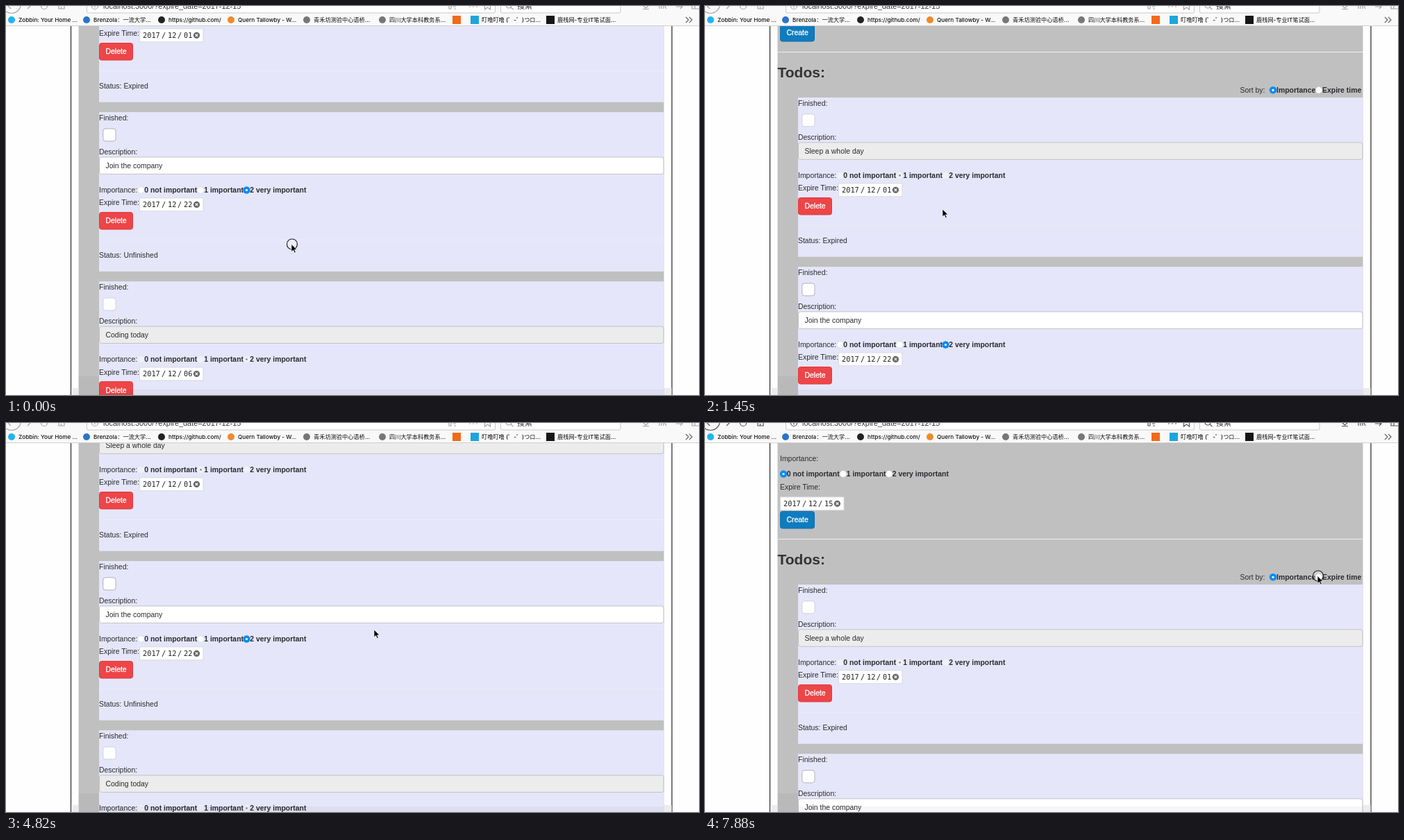
These frames come from a looping animation (998x561 px, 8000 ms). An HTML page:

```html
<!DOCTYPE html>
<html lang="en">
<head>
<meta charset="utf-8">
<title>Todo list</title>
<style>
  html, body { margin: 0; width: 100%; height: 100%; overflow: hidden; background: #fefefe; }
  svg { display: block; width: 998px; height: 561px; }
  text { font: 10.45px "Liberation Sans", Arial, sans-serif; fill: #2b2b2f; white-space: pre; }
  .b { font-weight: bold; }
  .h { font-size: 21px; font-weight: bold; fill: #333; }
  .date { font: 10.3px "DejaVu Sans Mono", monospace; fill: #222; }
  .btn { fill: #fff; stroke: #fff; stroke-width: .3; }
  .mark { font: 500 8.2px Inter, "Noto Sans CJK SC", "Noto Sans CJK", sans-serif; fill: #111; }
  .url { font-size: 10.9px; fill: #333; }
  #tools { fill: none; stroke: #a5a5a5; stroke-width: 1.2; }
  #tools.active { stroke: #555; }
</style>
</head>
<body>
<svg viewBox="0 0 998 561">
  <rect width="998" height="561" fill="#fefefe"/>
  <path d="M93.5 28V561M959 28V561" stroke="#333" stroke-width="1.3"/>
  <rect x="104.5" y="28" width="843" height="533" fill="#c0c0c0"/>
  <g id="page"></g>
  <path d="M94 551h10.500v10h-10.500zM948 551h10.500v10h-10.500z" fill="#ececec"/>
  <path d="M104.500 534H134V561h-29.500zM134 553h813.500v8H134z" fill="#000" opacity=".035"/>
  <g id="chrome"></g>
  <g id="pointer">
    <circle id="ring" cx="1" r="7.5" fill="#fff" fill-opacity=".25" stroke="#222" stroke-width="1.2"/>
    <path d="M0 0V11L2.600 8.600L4.500 12.600L6.300 11.800L4.500 7.900H8Z" fill="#000" stroke="#fff" stroke-width=".7"/>
  </g>
</svg>
<script>
const $ = id => document.getElementById(id);
const text = (x, y, s, cls = '') => `<text x="${x}" y="${y}" class="${cls}">${s}</text>`;
const rect = (x, y, w, h, fill, more = '') =>
  `<rect x="${x}" y="${y}" width="${w}" height="${h}" fill="${fill}" ${more}/>`;
const dot = (x, y, r, fill, more = '') => `<circle cx="${x}" cy="${y}" r="${r}" fill="${fill}" ${more}/>`;
const move = (x, y, s) => `<g transform="translate(${x} ${y})">${s}</g>`;

function radio(x, y, on, off) {
  if (off) return dot(x, y, 4.6, '#f1f1f6') + (on ? dot(x, y, 1.3, '#888') : '');
  return on ? dot(x, y, 5.2, '#0a8cf5') + dot(x, y, 1.6, '#fff')
            : dot(x, y, 4.7, '#fff', 'stroke="#d2d2d6" stroke-width=".6"');
}

const LEVELS = ['0 not important', '1 important', '2 very important'];
const levels = (x, y, picked, off) => LEVELS.map((label, i) => {
  const left = x + [0, 86, 152][i];
  return radio(left, y - 3.5, i === picked, off) + text(left + 4.7, y, label, 'b');
}).join('');

const dateBox = (x, y, day) => move(x, y,
  rect(.5, .5, 91.5, 19, '#fff', 'stroke="#d9d9dd"') +
  [[5, '2017'], [32, '/'], [41, '12'], [55, '/'], [64, day]]
    .map(([dx, s]) => text(dx, 13.4, s, 'date')).join('') +
  dot(82.5, 10, 4.6, '#666') +
  '<path d="M80.700 8.200l3.600 3.600m0-3.600l-3.600 3.600" stroke="#fff" stroke-width="1.200"/>');

const button = (x, y, w, label, fill, edge) =>
  rect(x + .5, y + .5, w - 1, 24.5, fill, `rx="3" stroke="${edge}"`) + text(x + 9.5, y + 16.4, label, 'btn');

const card = (y, { name, level, day, status, off }) => move(0, y,
  rect(134, 0, 813.5, 229.7, '#e6e6fa') +
  text(134, 11.8, 'Finished:') +
  rect(139.8, 23.8, 18.2, 18, '#fff', `rx="3.5" stroke="${off ? '#d0d0d8' : '#b0b0b6'}"`) +
  text(134, 61, 'Description:') +
  rect(134.5, 64.8, 812.5, 24.5, off ? '#ececec' : '#fff', 'rx="3" stroke="#c2c2c8"') +
  text(143.5, 81, name) +
  text(134, 115.9, 'Importance:') + levels(194.5, 115.9, level, off) +
  text(134, 134.4, 'Expire Time:') + dateBox(192, 123.3, day) +
  button(134, 144, 49, 'Delete', '#ed4548', '#de3a3e') +
  rect(134, 184, 813.5, 1, '#ececf5') +
  text(134, 210.4, 'Status: ' + status));

const todos = [
  { name: 'Sleep a whole day', level: 1, day: '01', status: 'Expired', off: true },
  { name: 'Join the company', level: 2, day: '22', status: 'Unfinished' },
  { name: 'Coding today', level: 2, day: '06', status: 'Expired', off: true }
];

// The page's zero line is the top of the first card.
$('page').innerHTML =
  text(108, -178.2, 'Importance:') + levels(113, -156, 0) +
  text(108, -137.4, 'Expire Time:') + dateBox(108, -126.7, '15') +
  button(108, -106, 50, 'Create', '#107cbe', '#0c70ae') +
  rect(104.5, -66, 843, 1, '#eee') +
  text(104.5, -29.4, 'Todos:', 'h') +
  text(770.5, -7, 'Sort by:') +
  radio(818, -10.7, true) + text(823, -7, 'Importance', 'b') +
  radio(884, -10.7) + text(889, -7, 'Expire time', 'b') +
  todos.map((todo, i) => card(i * 244.1, todo)).join('');

const marks = [
  [18, 'Zobbin: Your Home ...', '#20b5f0'],
  [126, 'Brenzola：一流大学...', '#2a73cc'],
  [234, 'https://github.com/', '#222'],
  [334, 'Quern Tallowby - W...', '#f08a2c'],
  [443, '青禾坊测验中心语桥...', '#777'],
  [552, '四川大学本科教务系...', '#777'],
  [659, '', '#f26a1b', true],
  [685, '叮噜叮噜 (゜-゜)つロ...', '#1ea5dc', true],
  [794, '鹿栈网-专业IT笔试面...', '#161616', true]
];

$('chrome').innerHTML =
  rect(0, 0, 998, 28.5, '#f9f9f9') + rect(0, 28, 998, 1, '#d0d0d0') +
  rect(116.5, -14, 588, 24, '#fff', 'rx="2" stroke="#c8c8c8"') +
  rect(712.5, -14, 172.5, 24, '#fff', 'rx="2" stroke="#c8c8c8"') +
  text(140, 3.6, 'localhost:3000/?expire_date=2017-12-15', 'url') +
  text(736, 4, '搜索', 'url') +
  `<g id="tools">
    <circle cx="8" cy="-3" r="13.5"/><path d="M3 0l4 4M31 4l5-5M76 0v4h8v-4M79.500 4v-3"/>
    <circle cx="55" cy="0" r="4.500"/><circle cx="128" cy="0" r="4.500"/><path d="M128 -1v3.500"/>
    <path d="M638 0v4h3v-4M644 1h4m-3 3h3M667 1h2m3 0h2m3 0h2M689.500 0v5l4-3l4 3v-5"/>
    <circle cx="724" cy="-1" r="4"/><path d="M727 2l3.500 3M918 0l3.500 3l3.500-3M917 4.500h9"/>
    <path d="M941 0v4m3-4v4m3-4v4m2-4l2 4M965 1h9m-3-3l3 3l-3 3M988 0v4h11M992 0v4"/>
  </g>` +
  marks.map(([x, label, fill, square]) =>
    (square ? rect(x - 16, 14, 12, 12, fill) : dot(x - 10, 20, 5, fill)) +
    text(x, 23.3, label, 'mark')).join('') +
  '<path d="M979 16l4 4l-4 4m5-8l4 4l-4 4" fill="none" stroke="#666" stroke-width="1.200"/>';

const ticks = [
  [0, 0, 1], [150, 680, 4], [850, 1000, 2], [1450, 1620, 2], [1950, 2850, 7],
  [3290, 3290, 1], [3440, 4070, 5], [4370, 4370, 1], [4670, 5170, 4], [5350, 5350, 1],
  [5650, 6270, 5], [6570, 7150, 5], [7440, 7880, 4]
].flatMap(([a, b, n]) => Array.from({ length: n }, (_, i) => Math.round(a + (b - a) * i / Math.max(n - 1, 1))));

const scroll = [
  [0, -91], [150, -78], [327, -32], [503, 28], [680, 74], [850, 105], [1000, 120], [1400, 120],
  [1450, 132], [1620, 134], [2850, 134], [3290, 65], [3440, 8], [3600, -42], [3760, -68],
  [4070, -83], [4600, -83], [4670, -45], [4840, 85], [5000, 185], [5170, 231], [5350, 233]
];
const pointer = [
  [0, 411, 343.5], [1000, 411, 343.5], [1450, 342, 293], [1620, 290, 243], [2850, 376, 512],
  [3290, 376, 500.5], [3440, 376, 526], [4070, 376, 526], [4370, 523, 299], [4670, 530, 298],
  [5170, 615, 292], [5350, 883, 252], [6270, 820, 222], [6720, 820, 221], [7150, 842, 220], [7880, 882, 220.5]
];

function sample(track, t) {
  const i = track.findIndex(p => p[0] > t);
  if (i < 0) return track[track.length - 1].slice(1);
  const a = track[i - 1], b = track[i], k = (t - a[0]) / (b[0] - a[0]);
  return a.slice(1).map((v, j) => v + (b[j + 1] - v) * k);
}

function draw(now) {
  const time = now % 8000;
  const t = ticks.findLast(tick => tick <= time);
  const [top] = sample(scroll, t);
  const [x, y] = sample(pointer, t);
  const pressed = t < 150 || t === 6570 || t >= 7880;
  $('page').setAttribute('transform', `translate(0 ${Math.round(top)})`);
  $('pointer').setAttribute('transform', `translate(${x} ${y})`);
  $('ring').setAttribute('visibility', pressed ? 'visible' : 'hidden');
  $('tools').classList.toggle('active', t >= 6570);
  requestAnimationFrame(draw);
}
draw(performance.now());
</script>
</body>
</html>
```
